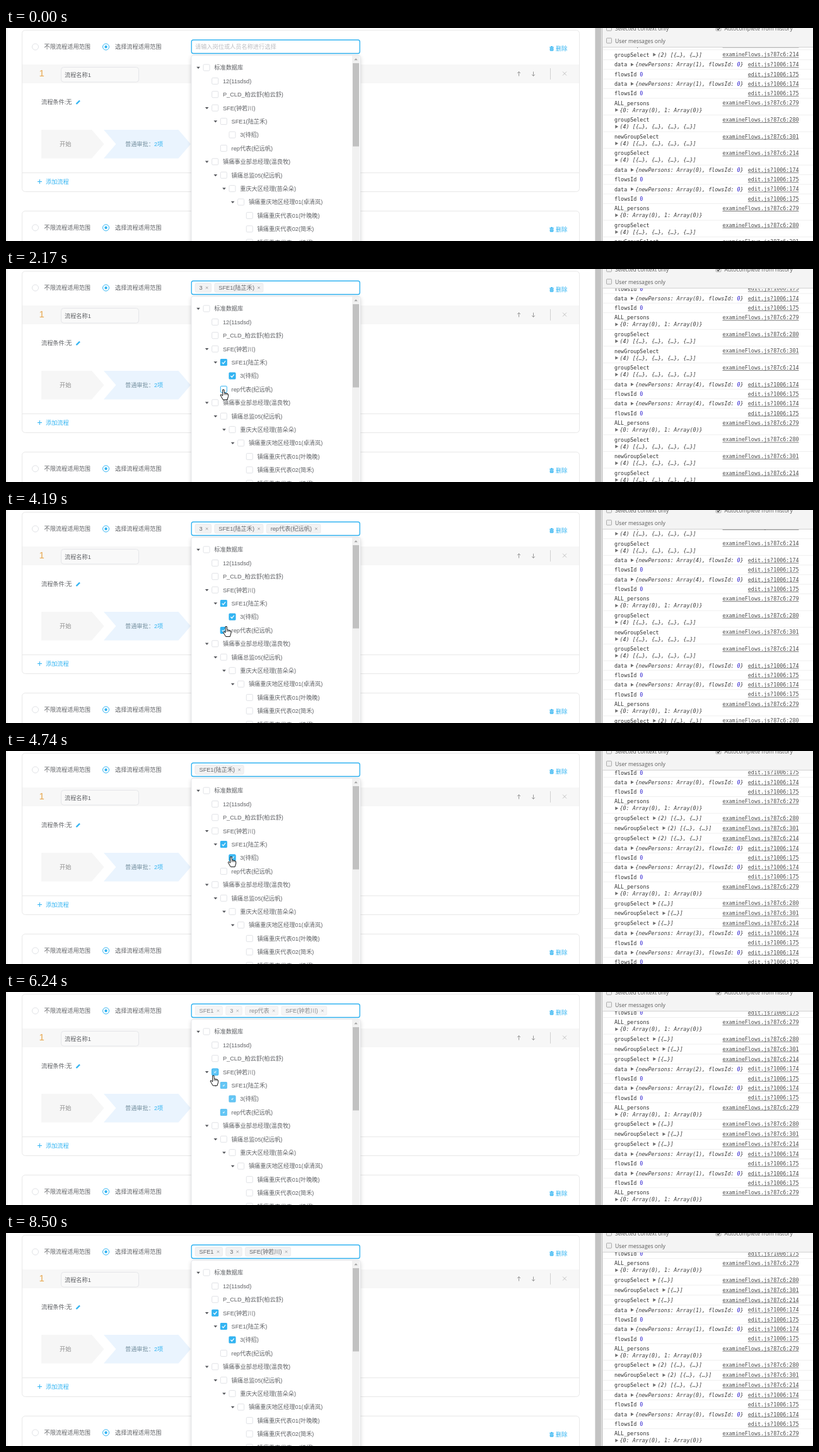
An HTML page with a canvas that plays this animation: 1280 by 339 pixels, repeating every 9190 ms.

```html
<!DOCTYPE html>
<html lang="zh">
<head>
<meta charset="utf-8">
<title>流程设置</title>
<style>
html, body { margin: 0; width: 100%; height: 100%; overflow: hidden; background: #fff; }
canvas { display: block; width: 1280px; height: 339px; }
</style>
</head>
<body>
<canvas id="stage"></canvas>
<script>
const W = 1280, H = 339, LOOP = 9190;
const BLUE = '#32b4f2', TEXT = '#5f6165', LINE = '#e8e8e8';
const SANS = '"Liberation Sans", "Noto Sans CJK SC", "Noto Sans CJK", sans-serif';
const UI = `9.2px ${SANS}`;
const MONO = '8.4px "DejaVu Sans Mono", monospace';
const canvas = document.getElementById('stage');
const ctx = canvas.getContext('2d');
const ratio = window.devicePixelRatio || 1;
canvas.width = W * ratio;
canvas.height = H * ratio;

// Two spaces of indent per level.
const tree = `标准数据库
  12(11sdsd)
  P_CLD_柏云舒(柏云舒)
  SFE(钟若川)
    SFE1(陆芷禾)
      3(待招)
    rep代表(纪远帆)
  镇痛事业部总经理(温良牧)
    镇痛总监05(纪远帆)
      重庆大区经理(苗朵朵)
        镇痛重庆地区经理01(卓清岚)
          镇痛重庆代表01(叶晚晚)
          镇痛重庆代表02(简禾)
          镇痛重庆代表03(待招)`.split('\n').map((raw, i) => {
  const label = raw.trim(), level = (raw.length - label.length) / 2;
  return { label, level, x: 318 + 13.65 * level, y: 63 + 21.4 * i };
});

// Places where the pointer rests.
const stops = [
  { x: 1076, y: 332, arrive: 70, leave: 70 },
  { x: 341, y: 146, arrive: 930, leave: 1340 },
  { x: 345, y: 192, arrive: 1860, leave: 4140 },
  { x: 359, y: 171, arrive: 4440, leave: 4720 },
  { x: 347, y: 154, arrive: 4980, leave: 5400 },
  { x: 329, y: 133, arrive: 5940, leave: 6330 },
  { x: 346, y: 187, arrive: 6860, leave: 7970 },
  { x: 1070, y: 345, arrive: 8500, leave: 8500 }
];
const clicks = [
  { at: 1200, groups: 2 }, { at: 2130, groups: 1 }, { at: 4170, groups: 1 }, { at: 4650, groups: 1 },
  { at: 5160, groups: 2 }, { at: 6060, groups: 4 }, { at: 7480, groups: 1 }
];
const REACTION = 80, ROW_DELAY = 10, FADE = 200;

const clamp = v => Math.max(0, Math.min(1, v));
const easeOut = u => 1 - (1 - u) ** 2;

function pointerAt(t) {
  const k = stops.findIndex(s => s.arrive > t);
  if (k < 1) return null;
  const from = stops[k - 1], to = stops[k];
  const e = easeOut(clamp((t - from.leave) / (to.arrive - from.leave)));
  return { x: from.x + (to.x - from.x) * e, y: from.y + (to.y - from.y) * e };
}
const boxUnder = p => p ? tree.findIndex(n => Math.abs(p.x - n.x) < 6.5 && Math.abs(p.y - n.y) < 6.5) : -1;

// Checking a node also checks everything below it; unchecking affects the node alone.
function toggle(selection, row) {
  if (selection.some(s => s.row === row)) return selection.filter(s => s.row !== row);
  const below = [];
  for (let i = row + 1; tree[i].level > tree[row].level; i++)
    below.push({ row: i, tag: tree[i].label.split('(')[0] });
  return [...selection, ...below, { row, tag: tree[row].label }];
}

const states = [{ at: -LOOP, selection: [] }];
for (const { at } of clicks)
  states.push({ at: at + REACTION, selection: toggle(states.at(-1).selection, boxUnder(pointerAt(at))) });

function buildLog() {
  const rows = [];
  let y = -16;
  const addRound = (persons, groups, at) => {
    const wide = groups > 2;
    const list = (groups > 1 ? `(${groups}) ` : '') + `[${Array(groups).fill('{…}').join(', ')}]`;
    const add = (label, file, body, height, wrap) => {
      if (at !== null) at += ROW_DELAY;
      rows.push({ y, at, label, file, body, height, wrap });
      y += height;
    };
    add('ALL_persons', 'examineFlows.js?87c6:279', '{0: Array(0), 1: Array(0)}', 26.6, true);
    for (const [label, line] of [['groupSelect', 280], ['newGroupSelect', 301], ['groupSelect', 214]])
      add(label, 'examineFlows.js?87c6:' + line, list, wide ? 26.6 : 15.9, wide);
    for (let k = 0; k < 2; k++) {
      add('data', 'edit.js?1006:174', `{newPersons: Array(${persons}), flowsId: 0}`, 15.3, false);
      add('flowsId', 'edit.js?1006:175', '', 15.3, false);
    }
  };
  addRound(1, 2, null);
  for (const persons of [0, 4, 0]) addRound(persons, 4, null);
  clicks.forEach((c, i) => addRound(states[i + 1].selection.length, c.groups, c.at));
  return rows;
}
const log = buildLog();
const scrollAt = t => log.reduce((sum, r) => r.at !== null && r.at <= t ? sum + r.height : sum, 0);

function text(str, x, y, color = TEXT, font = UI, align = 'left') {
  ctx.font = font;
  ctx.fillStyle = color;
  ctx.textAlign = align;
  ctx.fillText(str, x, y + 3.4);
}
function rect(x, y, w, h, color) {
  ctx.fillStyle = color;
  ctx.fillRect(x, y, w, h);
}
function paint(fill, stroke, width = 1) {
  if (fill) { ctx.fillStyle = fill; ctx.fill(); }
  if (stroke) { ctx.strokeStyle = stroke; ctx.lineWidth = width; ctx.stroke(); }
}
function round(x, y, w, h, r, fill, stroke, width) {
  ctx.beginPath();
  ctx.roundRect(x, y, w, h, r);
  paint(fill, stroke, width);
}
function poly(points, fill, stroke, width, open) {
  ctx.beginPath();
  points.forEach(([x, y], i) => i ? ctx.lineTo(x, y) : ctx.moveTo(x, y));
  if (!open) ctx.closePath();
  paint(fill, stroke, width);
}
const line = (x1, y1, x2, y2, color, width = 1) =>
  poly([[x1, y1], [x2, y2]], null, color, width, true);
function cross(x, y, r, color, width) {
  line(x - r, y - r, x + r, y + r, color, width);
  line(x - r, y + r, x + r, y - r, color, width);
}
function circle(x, y, r, fill, stroke) {
  ctx.beginPath();
  ctx.arc(x, y, r, 0, 7);
  paint(fill, stroke);
}
function tick(x, y, size, color) {
  poly([[x - 2.6 * size, y], [x - .7 * size, y + 2.2 * size], [x + 2.8 * size, y - 2.2 * size]],
    null, color, 1.3, true);
}

function panel(y) {
  round(25.5, y - 26.5, 884, 257, 5, '#fff', LINE);
  circle(46.5, y, 5, '#fff', '#e0e2e6');
  text('不限流程适用范围', 60.5, y);
  circle(158.5, y, 5, '#fff', BLUE);
  circle(158.5, y, 2.2, BLUE);
  text('选择流程适用范围', 173, y);
  rect(862, y + .2, 7, 1, BLUE);
  rect(864, y - 1, 3, 1, BLUE);
  round(862.7, y + 1.6, 5.6, 5, 1, BLUE);
  for (const x of [864.5, 866.5]) line(x, y + 2.5, x, y + 5.5, '#fff', .6);
  text('删除', 872, y + 2.8, BLUE);
}

function moveArrow(x, y, dir) {
  line(x, y - 3.5, x, y + 3.5, '#999');
  poly([[x - 2.5, y + dir], [x, y + 3.5 * dir], [x + 2.5, y + dir]], null, '#999', 1, true);
}

function step(x, right, notch, fill) {
  const top = 162, bottom = 207.5, mid = (top + bottom) / 2;
  poly([[x, top], [right - 19.5, top], [right, mid], [right - 19.5, bottom], [x, bottom], [x + notch, mid]], fill);
}

function drawPage() {
  rect(0, 0, W, H, '#fff');
  line(1.5, 0, 1.5, H, '#ececec');
  panel(30);
  panel(317.8);
  rect(26, 58, 883, 30, '#f7f7f7');
  text('1', 52.5, 74, '#e8a850', `15px ${SANS}`);
  round(87.5, 62.5, 123, 23.5, 4, '#f9f9f9', '#e5e6e9');
  text('流程名称1', 93, 74.5);
  moveArrow(813.5, 73, -1);
  moveArrow(836.5, 73, 1);
  line(863.5, 64, 863.5, 82, '#d0d0d0');
  cross(886, 72.5, 3, '#bbb', .9);
  text('流程条件:无', 56, 118);
  line(111.5, 121, 117, 115.5, BLUE, 2.4);
  step(56, 155.5, 0, '#f6f6f6');
  text('开始', 85, 184.5, '#8c8c8c');
  step(155, 293, 19.5, '#eaf4fe');
  text('普通审批：', 189, 184.5, '#76909f');
  text('2项', 235, 184.5, BLUE);
  line(26, 230.5, 909, 230.5, LINE);
  line(50, 244.5, 57, 244.5, BLUE);
  line(53.5, 241, 53.5, 248, BLUE);
  text('添加流程', 63, 244.5, BLUE);
}

function drawTags(selection, alphaOf) {
  let x = 299.5;
  for (const { tag } of selection) {
    ctx.font = UI;
    const w = ctx.measureText(tag).width;
    ctx.globalAlpha = alphaOf(tag);
    round(x + .5, 22.5, w + 20.5, 14.5, 2.5, '#f2f2f3', '#e9e9eb', .8);
    text(tag, x + 7, 29.8, '#66686c');
    cross(x + w + 14, 29.8, 1.7, '#8e9094', .8);
    ctx.globalAlpha = 1;
    x += w + 25.7;
  }
}

function drawSelect(now, before, u) {
  const has = (selection, tag) => selection.some(s => s.tag === tag);
  round(294.2, 19, 267, 21.5, 3, '#fff', BLUE, 1.4);
  if (!now.length) text('请输入岗位或人员名称进行选择', 300, 29.8, '#bbbdc2');
  drawTags(before, tag => has(now, tag) ? 0 : 1 - u);
  drawTags(now, tag => has(before, tag) ? 1 : easeOut(u));
}

function drawTree(now, before, u, hovered) {
  ctx.save();
  ctx.shadowColor = 'rgba(0,0,0,.18)';
  ctx.shadowBlur = 7;
  ctx.shadowOffsetY = 2;
  round(294, 43.5, 268, 330, 3, '#fff');
  ctx.restore();
  round(294, 43.5, 268, 330, 3, null, '#e2e4e8', .8);
  rect(549, 44, 11.5, 295, '#f1f1f1');
  rect(550, 56, 10, 132.5, '#c1c1c1');
  poly([[552.3, 51.3], [555, 48.3], [557.7, 51.3]], '#a3a3a3');
  tree.forEach(({ label, level, x, y }, i) => {
    const was = before.some(s => s.row === i), is = now.some(s => s.row === i);
    const size = was === is ? +is : is ? u : 1 - u;
    if (tree[i + 1]?.level > level)
      poly([[x - 15.8, y - 1.3], [x - 10.2, y - 1.3], [x - 13, y + 2]], '#55575c');
    round(x - 5, y - 5, 10, 10, 1.5, '#fff', hovered === i ? BLUE : '#e0e2e6');
    ctx.globalAlpha = is ? easeOut(size) : size;
    round(x - 5.5, y - 5.5, 11, 11, 1.5, BLUE);
    tick(x, y, size, '#fff');
    ctx.globalAlpha = 1;
    text(label, x + 12.3, y);
  });
}

function drawMessage(body, x, y) {
  poly([[x - 7.2, y - 2.8], [x - 2.4, y], [x - 7.2, y + 2.8]], '#6e6e6e');
  const font = 'italic ' + MONO, cell = ctx.measureText('0').width;
  const [head, tail] = body.split(/(?<=flowsId: )0/);
  text(head, x, y - .3, '#3c3c3c', font);
  if (!tail) return;
  text('0', x + head.length * cell, y - .3, '#2a1ccf', font);
  text(tail, x + (head.length + 1) * cell, y - .3, '#3c3c3c', font);
}

function option(x, y, label, checked) {
  round(x, y - 4.5, 8, 8, 1, '#f0f0f0', '#aaa');
  if (checked) tick(x + 4.3, y, 1, '#444');
  text(label, x + 13.5, y, '#5a5a5a', '8.65px "Open Sans", "Noto Sans", sans-serif');
}

function drawConsole(scroll) {
  rect(934, 0, 12, H, '#f1f1f1');
  rect(934.5, 0, 9.5, H, '#c3c3c3');
  rect(945, 0, 1.5, H, '#b8b8b8');
  rect(946.5, 0, W, H, '#fff');
  ctx.font = MONO;
  const cell = ctx.measureText('0').width;
  for (const row of log) {
    const y = row.y - scroll;
    if (y < 0 || y > H + 20) continue;
    line(946.5, y + row.height - 7.7, W, y + row.height - 7.7, '#efefef');
    text(row.label, 965, y - .3, '#303030', MONO);
    text(row.file, 1257.5, y - .5, '#4c4c4c', MONO, 'right');
    rect(1257.5 - row.file.length * cell, y + 4, row.file.length * cell, .9, '#6c6c6c');
    const next = 965 + (row.label.length + 1) * cell;
    if (!row.body) text('0', next, y - .3, '#2a1ccf', MONO);
    else if (row.wrap) drawMessage(row.body, 973.5, y + 11);
    else drawMessage(row.body, next + 8, y);
  }
  rect(946.5, 0, 334, 30, '#f4f4f4');
  line(946.5, 30.5, W, 30.5, '#d2d2d2');
  option(952.5, .8, 'Selected context only');
  option(1126, .8, 'Autocomplete from history', true);
  option(952.5, 20.6, 'User messages only');
}

function drawPointer({ x, y }, hand) {
  ctx.save();
  ctx.translate(x, y);
  ctx.lineJoin = 'round';
  if (hand) {
    poly([[-1.3, 0], [.9, 0], [1.3, 5.2], [5.6, 6.2], [7.4, 7.2], [7.6, 10.5],
      [6, 16], [-.8, 16], [-4.8, 9.2], [-4.2, 7.8], [-1.3, 9.7]], '#fff', '#111', 1);
    for (const d of [1.3, 3.5, 5.6]) line(d, 5.5, d, 8.5, '#222', .8);
  } else {
    poly([[0, 0], [0, 12.3], [2.8, 9.8], [4.6, 14], [6.5, 13.2], [4.8, 9.2], [8.6, 8.9]], '#fff', '#111', 1);
  }
  ctx.restore();
}

function draw(t) {
  ctx.setTransform(ratio, 0, 0, ratio, 0, 0);
  const k = states.findLastIndex(s => s.at <= t);
  const now = states[k].selection, before = states[Math.max(0, k - 1)].selection;
  const u = clamp((t - states[k].at) / FADE);
  const pointer = pointerAt(t), hovered = boxUnder(pointer);
  drawPage();
  drawSelect(now, before, u);
  drawTree(now, before, u, hovered);
  drawConsole(scrollAt(t));
  if (pointer) drawPointer(pointer, hovered >= 0);
}

const start = performance.now();
function frame() {
  draw((performance.now() - start) % LOOP);
  requestAnimationFrame(frame);
}
frame();
</script>
</body>
</html>
```
